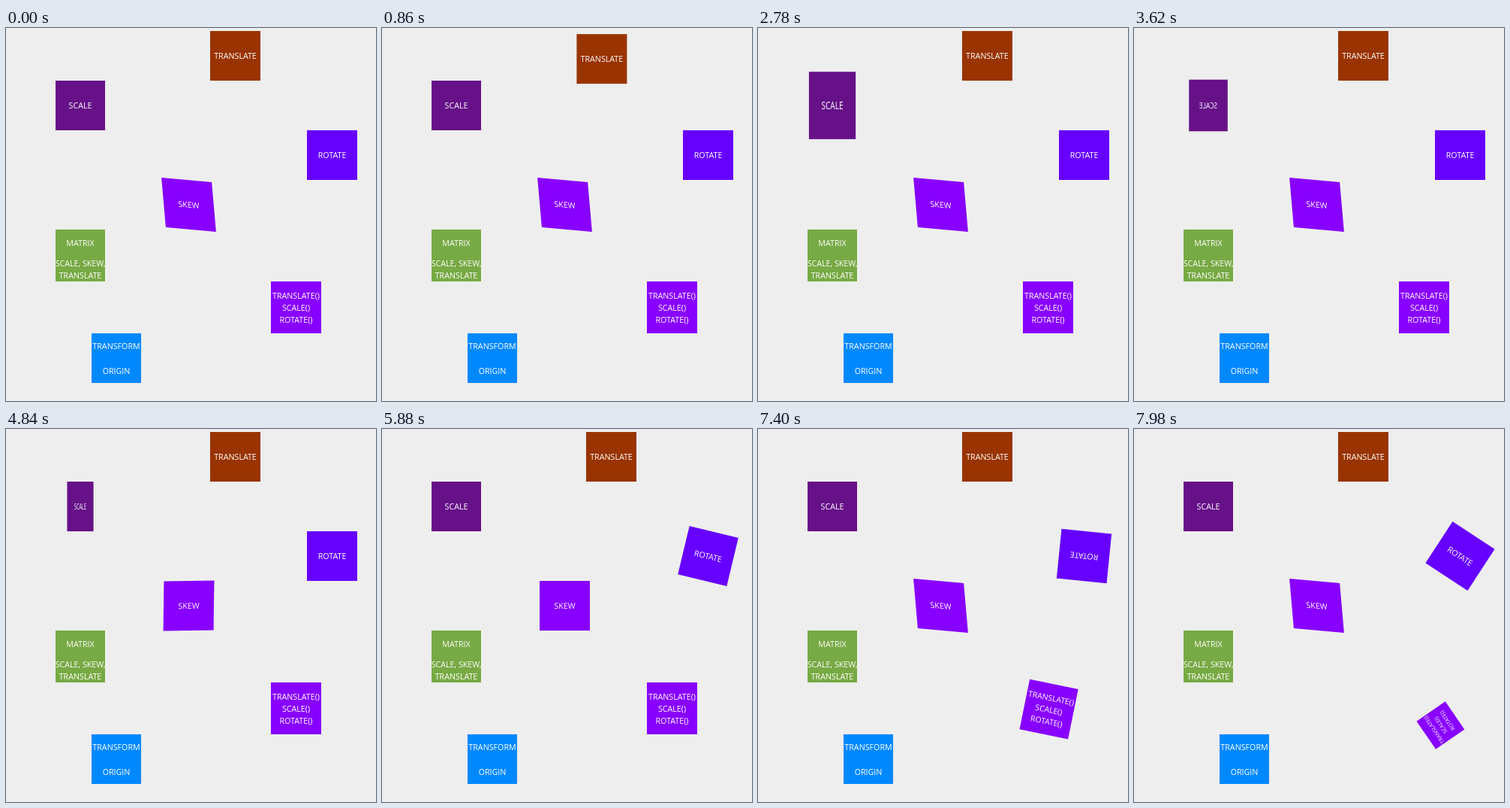
Write an HTML page that moves like this. It is 493 px wide and 496 px high and loops after 8000 ms.

```html
<!DOCTYPE html>
<html lang="en">
<head>
<meta charset="utf-8">
<title>Transforms</title>
<style>
  html, body { margin: 0; width: 100%; height: 100%; overflow: hidden; background: #eee; }
  .box { position: absolute; color: #fff; font: 10.7px/16px "Open Sans", "Noto Sans", sans-serif; }
  .box span { position: absolute; left: -20px; right: -20px; text-align: center; white-space: nowrap; }
</style>
</head>
<body>
<script>
const LOOP = 8000, T = 1750;

// lines: [text, centre y inside the box]
// steps: [start, duration, goal]; a new step takes over from wherever the box is
const boxes = [
  { x: 272, y: 4, w: 67, h: 66, color: '#993300', lines: [['TRANSLATE', 33]],
    rest: [0, 0], steps: [[225, T, [-30, 10]], [1330, 1584, [0, 0]]],
    css: ([x, y]) => `translate(${x}%, ${y}%)` },
  { x: 66, y: 70, w: 66, h: 66, color: '#661188', lines: [['SCALE', 33]],
    rest: [1, 1], steps: [[1400, T, [1.5, 1.5]], [2500, T, [-1, 1]], [4030, T, [1, 1]]],
    css: ([x, y]) => `scale(${x}, ${y})` },
  { x: 401, y: 136, w: 67, h: 66, color: '#6600ff', lines: [['ROTATE', 33]],
    rest: [0], steps: [[5785, T, [360]], [6968, 1623, [0]]],
    css: ([a]) => `rotate(${a}deg)` },
  { x: 210, y: 202, w: 67, h: 66, color: '#8800ff', lines: [['SKEW', 33]],
    rest: [5], steps: [[4260, T, [-5]], [5430, 1628, [5]]],
    css: ([a]) => `skew(${a}deg, ${a}deg)` },
  { x: 66, y: 268, w: 66, h: 69, color: '#77aa44',
    lines: [['MATRIX', 18], ['SCALE, SKEW,', 45], ['TRANSLATE', 61]] },
  { x: 353, y: 337, w: 67, h: 69, color: '#8800ff',
    lines: [['TRANSLATE()', 19], ['SCALE()', 35], ['ROTATE()', 51]],
    rest: [0, 1, 0], steps: [[7315, T, [50, 0.5, 360]]],
    css: ([d, s, a]) => `translate(${d}%, ${d}%) scale(${s}) rotate(${a}deg)` },
  { x: 114, y: 406, w: 66, h: 66, color: '#0088ff',
    lines: [['TRANSFORM', 17], ['ORIGIN', 50]] }
];

// cubic-bezier(.25, .1, .25, 1), solved by bisection
function ease(p) {
  if (p <= 0) return 0;
  if (p >= 1) return 1;
  const curve = (s, a, b) => 3 * (1 - s) ** 2 * s * a + 3 * (1 - s) * s * s * b + s ** 3;
  let lo = 0, hi = 1;
  for (let i = 0; i < 24; i++) {
    const mid = (lo + hi) / 2;
    if (curve(mid, 0.25, 0.25) < p) lo = mid; else hi = mid;
  }
  return curve(lo, 0.1, 1);
}

function valueAt({ rest, steps }, t) {
  let value = rest;
  steps.forEach(([start, length, goal], i) => {
    const end = i + 1 < steps.length ? Math.min(t, steps[i + 1][0]) : t;
    const k = ease((end - start) / length);
    value = value.map((v, j) => v + (goal[j] - v) * k);
  });
  return value;
}

for (const b of boxes) {
  b.el = document.createElement('div');
  b.el.className = 'box';
  b.el.style.cssText =
    `left:${b.x}px;top:${b.y}px;width:${b.w}px;height:${b.h}px;background:${b.color}`;
  for (const [text, y] of b.lines) {
    const line = document.createElement('span');
    line.textContent = text;
    line.style.top = y - 8 + 'px';
    b.el.append(line);
  }
  document.body.append(b.el);
}

const moving = boxes.filter(b => b.steps);
const origin = performance.now();

function draw(now) {
  const t = Math.max(0, now - origin) % LOOP;
  for (const b of moving) b.el.style.transform = b.css(valueAt(b, t));
  requestAnimationFrame(draw);
}
draw(origin);
</script>
</body>
</html>
```
